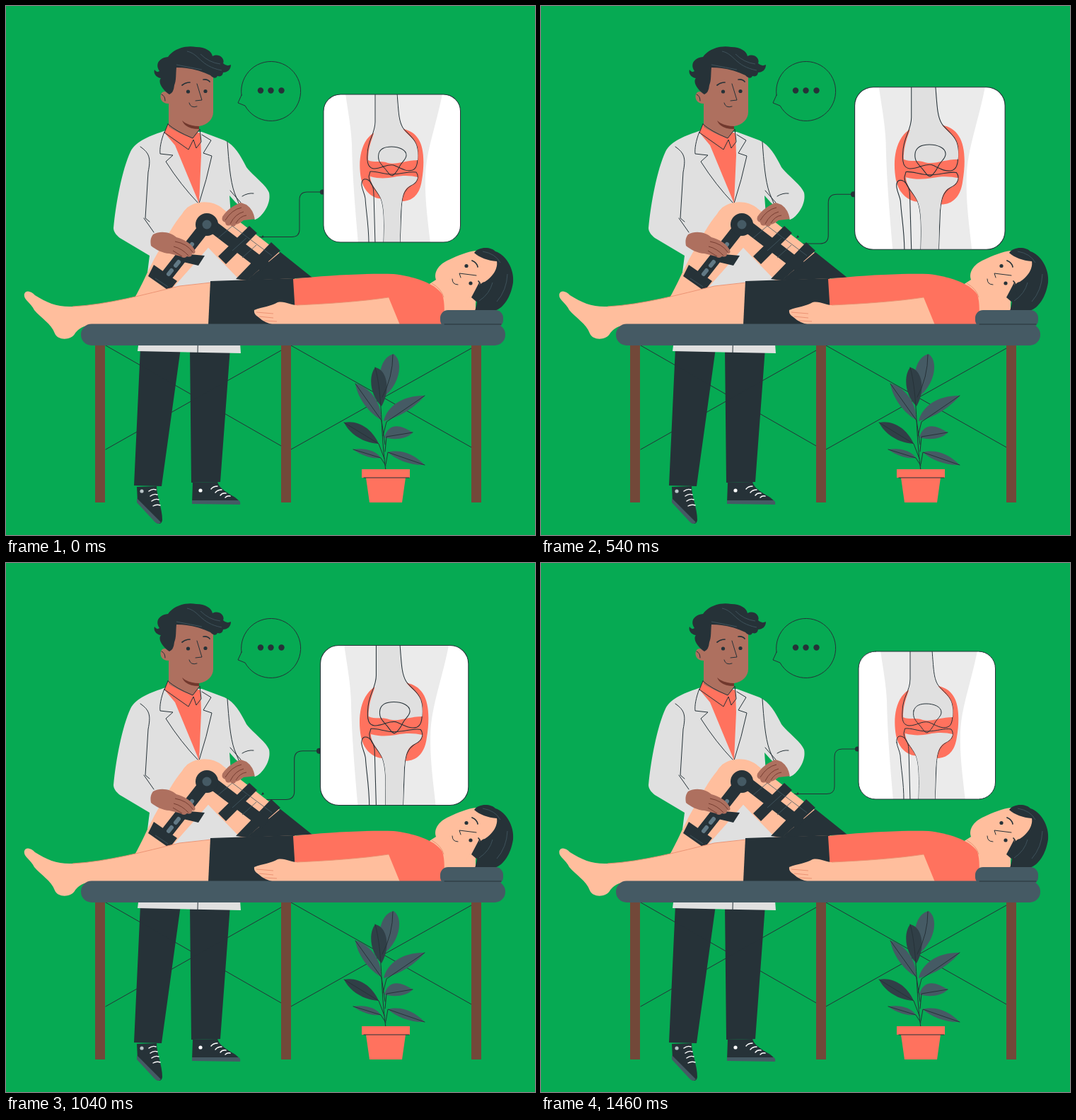
Write an HTML page that moves like this. It is 748 px wide and 748 px high and loops after 1.5 s.

```html
<!DOCTYPE html>
<html lang="en">
<head>
<meta charset="utf-8">
<style>
html, body { margin: 0; height: 100%; overflow: hidden; background: #06aa53; }
svg { display: block; width: 100vw; height: 100vh; }
.dark { fill: #263238; }
.slate { fill: #455a64; }
.coral { fill: #ff725e; }
.coat { fill: #e0e0e0; }
.skin { fill: #ffbe9d; }
.brown { fill: #ae705f; }
.wood { fill: #724839; }
.white { fill: #fff; }
.ink { fill: none; stroke: #263238; stroke-width: 1; stroke-linecap: round; stroke-linejoin: round; }
.bold { stroke-width: 1.7; }
.soft { fill: none; stroke: #455a64; stroke-width: .8; }
.fold { fill: none; stroke: #e98f70; stroke-width: .9; }
.lace { fill: none; stroke: #fff; stroke-width: 1.4; stroke-linecap: round; }
</style>
</head>
<body>
<svg viewBox="0 0 748 748">
  <defs>
    <clipPath id="frame"><rect x="449" y="125" width="193.5" height="209" rx="24"/></clipPath>
  </defs>

  <g id="panel">
    <path class="ink" d="M330 326.5H404Q415 326.5 415 316V274Q415 263 426 263H448"/>
    <circle class="dark" cx="447.5" cy="263" r="3.6"/>
    <g clip-path="url(#frame)">
      <path class="white" d="M449 125H643V335H449Z"/>
      <path fill="#ebebeb" d="M480 124C484 152 488 172 489 195C490 245 494 290 498 336H600C596 300 592 272 593 240C594 205 608 170 617 124Z"/>
      <path class="coral" d="M519 180C500 193 498 222 502 244C505 259 514 269 526 272L560 276C578 276 586 262 588 246C592 222 591 200 583 188C578 180 571 176 562 174Z"/>
      <path class="coat ink" d="M503 254C502 246 506 243 512 246C518 250 520 257 520 266L522 336H513C513 310 509 290 508 272C507 265 504 261 503 254Z"/>
      <path class="white ink" d="M515 234C524 233 533 238 546 238C560 238 570 233 580 235C584 240 583 249 574 253C562 260 560 270 559 285L557 336H534C535 305 535 285 530 272C526 262 513 252 513 241Z"/>
      <path class="coat" d="M515 241C530 245 540 243 548 242C562 239 573 240 582 242C581 249 576 252 570 255C560 261 560 275 558 290L557 336H534C535 305 535 285 530 272C526 262 515 253 515 241Z"/>
      <path class="white ink" d="M522 124V164C522 181 511 190 511 210C510 222 512 229 520 230C532 230 538 223 548 225C558 229 566 235 575 232C583 229 582 216 582 204C581 188 567 181 561 172C555 162 555 148 553 124Z"/>
      <path class="coat" d="M523 124V164C523 181 512 192 512 218C520 222 530 218 540 222C552 225 565 218 582 218C583 209 582 202 580 196C576 186 566 181 560 172C554 162 554 148 552 124Z"/>
      <path class="coat ink" d="M527 209C529 201 537 199 545 199C555 199 566 203 566 211C566 217 560 220 557 226C554 232 550 238 546 240C542 240 539 233 535 229C530 223 525 219 527 209Z"/>
    </g>
    <rect class="ink" x="449" y="125" width="193.5" height="209" rx="24"/>
  </g>

  <g id="bubble">
    <path class="white ink" d="M333 126L328 137L338 141A42 42 0 1 0 333 126Z"/>
    <g class="dark"><circle cx="360" cy="119.500" r="4.200"/><circle cx="374.500" cy="119.500" r="4.200"/><circle cx="389.500" cy="119.500" r="4.200"/></g>
  </g>

  <g id="doctor">
    <path class="dark" d="M190 484H247L220 679L181 678ZM260 484H317L303 673L262 674Z"/>
    <path class="dark" d="M185 680L213 679C213 694 221 710 221 727C220 733 215 734 210 728L186 701Z"/>
    <path class="slate" d="M185 696L219 730Q215 735 209 728L185 702Z"/>
    <path class="dark" d="M264 674L299 673C304 688 326 692 331 702L263 703Z"/>
    <path class="slate" d="M263 699H329Q332 701 331 705L263 704Z"/>
    <path class="lace" d="M202 686q5-4 10-2M204 693q5-4 10-2M206 700q5-4 10-2M208 707q5-3 10-1M290 683q3-4 9-4M296 688q3-4 9-4M303 692q3-4 8-3M310 695q3-3 7-2"/>
    <circle cx="192" cy="686" r="2.600" fill="#b8c4c8"/><circle class="white" cx="275" cy="685" r="2.600"/>

    <path class="coat" d="M226 176C205 183 183 191 176 206C164 232 155 280 152 314C152 319 156 324 161 328L203 353L186 488L332 491L316 268L325 278L352 302C365 296 375 278 372 264C368 253 347 238 340 228C332 212 323 196 309 190L277 178Z"/>
    <path class="coral" d="M229 167L224 179L239 197L273 279L276 211L275 180Z"/>
    <path class="brown" d="M228 122C216 116 214 139 230 138V171C240 178 255 184 264 187L273 176V170C285 168 293 160 293 150V85H238Z"/>
    <path d="M249 162Q258 170 273 170V174Q254 174 249 162Z" fill="#71382d"/>
    <path class="coral ink" d="M229 167L224 179L258 203L265 189L269 201L276 192L274 174L264 187Q240 177 229 167Z"/>
    <path class="ink" d="M224 178C219 190 217 203 218 209L236 211L226 220Q247 253 272 279M277 182L290 190L279 208L291 212Q284 245 273 279V284M190 199C203 208 205 215 201 235L197 300L203 305M195 300L209 320M313 192C315 220 317 247 323 264L330 281M317 261L332 278M334 269Q342 264 350 265M272 450L271 490"/>
    <path class="dark" d="M231 125C222 119 214 108 219 102C213 101 208 96 210 90Q213 95 217 92C210 82 217 73 229 72C237 60 255 55 269 58C282 58 291 64 292 71C301 66 310 74 307 81Q312 86 318 83C318 90 313 94 307 94Q306 101 299 99Q296 105 289 98C275 91 259 87 241 87C240 96 241 105 238 112Q237 123 231 125Z"/>
    <path class="soft" d="M241 83Q262 87 277 90M256 64C274 68 274 85 305 91M275 68Q287 80 303 82"/>
    <g class="dark"><circle cx="257.500" cy="121" r="2.600"/><circle cx="282" cy="120.500" r="2.600"/></g>
    <path class="ink bold" d="M249 112Q254 108 260 108M279 104Q285 103 288 107"/>
    <path class="ink" d="M270 110L277 133L268 134M259 137Q261 145 270 142M220 125Q225 127 225 134" stroke-width="1.300"/>
  </g>

  <g id="bentLeg">
    <path class="skin" d="M180 416C195 390 200 374 215 348C226 328 238 307 249 294C258 276 289 271 307 287L432 384L330 390L286 342L229 407Z"/>
    <path class="coat" d="M286 342L331 388L235 400Z"/>
    <path class="dark" d="M388 348L433 384L340 388Z"/>
    <path class="dark" d="M209 366L242 389L231 403L201 382ZM247 350L281 353L272 367L243 360ZM344 311L355 321L311 365L300 354ZM375 334L388 346L341 388L325 386Z"/>
    <path d="M284 309L222 388M286 307L367 369" fill="none" stroke="#263238" stroke-width="17"/>
    <path class="soft" d="M300 328L320 311L376 353M320 346L340 328M334 356L354 338M211 385L229 397"/>
    <circle class="dark" cx="284" cy="309" r="16"/><circle class="slate" cx="284" cy="309" r="6.500"/>
    <path d="M263 337l-3 4M244 362l-4 5M234 374l-4 5" stroke="#627985" stroke-width="6" stroke-linecap="round"/>
    <path class="dark" d="M363 324l2 3l-4 1z"/>
  </g>

  <g id="hands">
    <path class="brown" d="M208 323C219 317 233 320 241 327C252 330 262 336 267 345Q269 351 263 350Q263 356 256 354Q252 358 247 354L231 350C222 350 211 344 205 339Q203 329 208 323Z"/>
    <path class="brown" d="M329 279C339 275 349 281 353 289L354 301L336 303Q330 308 325 309Q323 314 317 310Q311 312 310 306Q304 304 306 298C312 289 319 284 329 279Z"/>
    <path d="M239 333Q256 336 264 348M237 340Q249 343 258 353M236 346L249 354M333 285Q319 288 310 303M336 291Q324 294 317 308M340 296Q331 297 325 307" fill="none" stroke="#71382d" stroke-width=".9"/>
    <path class="coat" d="M332 278L351 267L367 286Q361 299 352 302Q350 288 340 281Z"/>
  </g>

  <g id="patient">
    <path class="skin" d="M26 407C28 401 36 403 41 409C58 420 74 426 94 425C145 422 195 408 245 396L292 391V451H118C106 453 100 459 97 464C91 473 73 473 69 463C64 449 49 441 40 430C35 419 24 415 26 407Z"/>
    <path class="fold" d="M94 425C145 422 195 408 245 396L290 391"/>
    <path class="dark" d="M289 389L408 385L414 451H286Z"/>
    <path class="skin" d="M594 396L608 387C604 375 614 364 626 359C639 353 652 347 666 346L697 360L686 394L664 407V432H618Z"/>
    <path class="coral" d="M406 386C455 381 505 378 548 379C573 382 605 390 617 408Q622 424 618 451H410Z"/>
    <path class="fold" d="M602 392Q616 400 619 412"/>
    <path class="skin" d="M351 430C363 425 374 425 384 419C395 417 402 423 411 423C455 421 501 418 541 412L557 451H380Q365 448 357 440Q350 436 351 430Z"/>
    <path class="fold" d="M354 433L378 435M358 439L378 441M365 445L383 446M411 423C455 421 501 418 541 412"/>
    <path class="dark" d="M662 349C669 339 687 341 692 347C707 352 719 372 717 391C714 411 704 427 691 431H663C666 422 667 416 665 407C667 397 671 391 677 390C687 384 696 372 694 361C681 360 670 356 662 349Z"/>
    <path class="skin" d="M665 411C657 410 652 415 650 423Q653 432 663 430Z"/>
    <path class="dark" d="M658 412Q665 399 669 391L674 414L665 418Z"/>
    <path class="soft" d="M688 391Q684 407 669 417M709 379Q708 402 694 418M674 347Q692 350 699 363"/>
    <g class="dark"><circle cx="651" cy="367.500" r="2.600"/><circle cx="657" cy="392" r="2.600"/></g>
    <path class="ink bold" d="M659 360Q666 363 667 369M668 389Q672 393 670 397"/>
    <path class="ink" d="M665 381L641 378L643 384M631 386Q631 394 639 394" stroke-width="1.300"/>
  </g>

  <g id="table">
    <path class="ink" stroke-width=".8" d="M141 480L389 622M141 627L389 487M403 480L658 624M403 627L658 484"/>
    <path class="wood" d="M126 478H140V702H126ZM389 478H403V702H389ZM658 478H672V702H658Z"/>
    <rect class="slate" x="614" y="430" width="89" height="25" rx="11"/>
    <rect class="slate" x="106" y="449.500" width="600" height="30.500" rx="15"/>
    <path class="ink" stroke-width=".7" d="M620 450H700"/>
  </g>

  <g id="plant">
    <path class="slate" d="M531 555C523 525 530 496 548 492C563 502 557 538 531 555ZM530 585C512 575 497 553 494 534C511 537 532 559 530 585ZM534 587C539 565 563 550 592 551C580 566 558 581 534 587ZM535 610C540 592 554 589 575 603C567 613 547 614 535 610ZM530 639C516 641 500 634 491 627C507 624 524 629 530 639ZM540 631C558 626 578 634 592 649C573 650 552 642 540 631Z"/>
    <path d="M531 566C515 551 512 524 522 511C538 514 545 541 531 566ZM527 619C505 618 486 605 478 589C497 585 517 597 527 619Z" fill="#303f47"/>
    <path class="ink" d="M547 493Q547 525 532 553M494 534L531 586L536 620M592 551L538 588L533 608M478 589L527 619L535 640M575 603L538 609L536 630M491 627L530 639L537 650M592 649L540 631L537 648" stroke-width=".8"/>
    <path class="ink" d="M522 511C533 551 529 600 537 657" stroke-width="2.800"/>
    <path class="coral" d="M503 655H571V667H565L560 702H514L509 667H503Z"/>
    <path class="ink" d="M506 667H570" stroke-width=".9"/>
  </g>
</svg>
<script>
const PERIOD = 1500, SWELL = 0.11;
// [time in ms, amount of swell] for the two beats of each loop
const beats = [[0, 0], [170, .53], [380, .87], [450, 1], [540, .9], [670, .33], [790, 0],
  [920, .2], [1080, .92], [1140, 1], [1170, 1], [1460, 0], [1500, 0]];
const panel = document.getElementById('panel');

function swellAt(time) {
  const next = beats.findIndex(([at]) => at > time);
  const [t0, a] = beats[next - 1], [t1, b] = beats[next];
  return a + (b - a) * (time - t0) / (t1 - t0);
}

function draw() {
  const scale = 1 + SWELL * swellAt(performance.now() % PERIOD);
  panel.setAttribute('transform', `translate(504 229.5) scale(${scale}) translate(-504 -229.5)`);
  requestAnimationFrame(draw);
}
draw();
</script>
</body>
</html>
```
